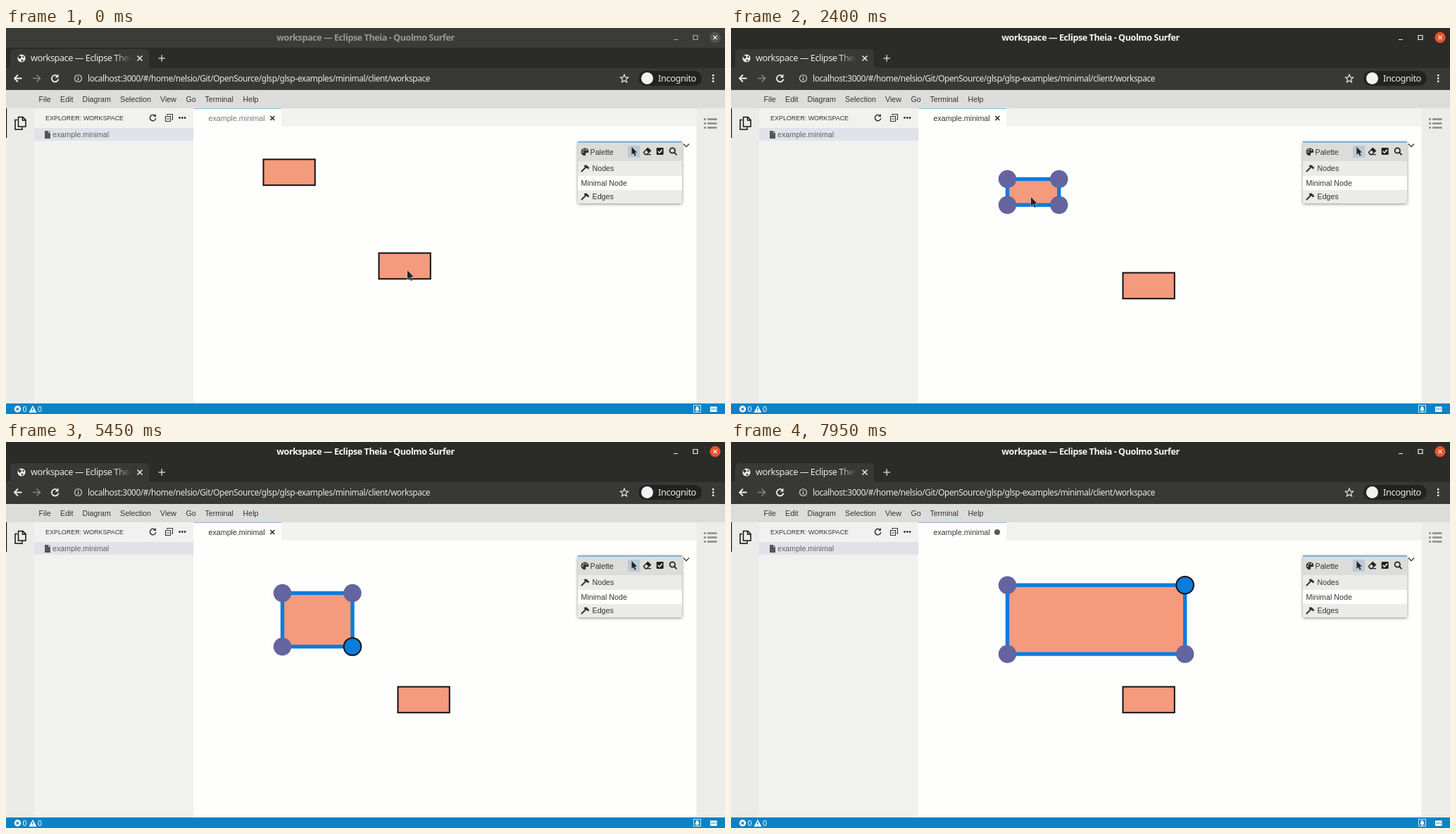
An HTML page for the animation above (8000 ms loop, 1021 px wide and 548 px high).

```html
<!DOCTYPE html>
<html lang="en">
<head>
<meta charset="utf-8">
<title>workspace</title>
<style>
  html, body { margin: 0; width: 100%; height: 100%; overflow: hidden; background: #fefefd; }
  svg { display: block; width: 100%; height: 100%; }
  text { font: 10.7px "Liberation Sans", Arial, sans-serif; fill: #333; white-space: pre; }
  .chrome text { font-family: "Noto Sans", sans-serif; letter-spacing: -.035em; fill: #e8e8e6; }
  .line { fill: none; stroke-width: 1.5; }
  .node { fill: #f49a7d; stroke: #111; stroke-width: 2; }
  .node.selected { stroke: #0b7cdb; stroke-width: 5.4; }
  .handle { fill: #6364a0; }
  .handle.hover { stroke: #10131c; stroke-width: 2; }
  .handle.active { fill: #0b7cdb; }
</style>
</head>
<body>
<svg viewBox="0 0 1021 548">
  <defs>
    <filter id="shadow" x="-10%" y="-10%" width="120%" height="125%">
      <feDropShadow dx="0" dy="1" stdDeviation="2" flood-opacity=".45"/>
    </filter>
    <linearGradient id="fade">
      <stop offset="0" stop-color="#383836" stop-opacity="0"/>
      <stop offset="1" stop-color="#383836"/>
    </linearGradient>
    <clipPath id="tabClip"><rect x="30" y="30" width="147" height="26"/></clipPath>
    <g id="hammer">
      <path d="M0 9L6 3" stroke="#333" stroke-width="2" stroke-linecap="round"/>
      <path d="M3 1Q6-1 8 1L11 4L9 6L7 4L5 4Z" fill="#333"/>
    </g>
  </defs>

  <!-- Browser window -->
  <g class="chrome">
    <rect id="titleBar" width="1021" height="28"/>
    <rect y="28" width="1021" height="29" fill="#2b2b28"/>
    <text id="title" x="510.5" y="18" text-anchor="middle" style="font-size:12.6px;font-weight:700">workspace — Eclipse Theia - Quolmo Surfer</text>
    <g id="buttons" class="line" style="stroke-width:1.2">
      <path d="M948 16.5H954M976 10.5H982V16.5H976Z"/>
      <circle id="close" cx="1007" cy="13.5" r="7.7" stroke="none"/>
      <path d="M1004.3 10.8L1009.7 16.2M1009.7 10.8L1004.3 16.2" stroke="#fff"/>
    </g>

    <path d="M0 57Q6 57 6 51V36Q6 30 12 30H197Q203 30 203 36V51Q203 57 209 57H1021V88H0Z" fill="#383836"/>
    <circle cx="22" cy="43" r="5.6" fill="#eee"/>
    <path d="M18 39Q22 39 22 42L19 44L17 41M23 39L26 41L24 43M21 45L25 45L23 48Z" fill="#383836"/>
    <text x="35" y="47" clip-path="url(#tabClip)" style="font-size:12.7px">workspace — Eclipse Theia</text>
    <rect x="154" y="33" width="24" height="20" fill="url(#fade)"/>
    <g class="line" stroke="#eee">
      <path d="M186.5 39.5L193.5 46.5M193.5 39.5L186.5 46.5"/>
      <path d="M216.500 43H226M221.250 38.250V47.750" stroke="#ccc"/>
      <path d="M22.500 71.500H12.500M17 66.500L12 71.500L17 76.500" stroke-width="1.8"/>
      <path d="M38 71.500H48M43.500 66.500L48.500 71.500L43.500 76.500" stroke="#858582"/>
      <path d="M73.400 68.500A4.800 4.800 0 1 0 74.500 72.500" stroke-width="1.8"/>
      <circle cx="102.500" cy="71.500" r="5" stroke="#ccc" stroke-width="1.200"/>
      <path d="M102.500 70.800V74.500M102.500 68.300V69.700" stroke="#ccc"/>
      <path d="M878 66L879.600 69.900L883.600 70.200L880.500 72.900L881.500 77L878 74.700L874.500 77L875.500 72.900L872.400 70.200L876.400 69.900Z" stroke-width="1.100"/>
    </g>
    <path d="M74.500 65.500V70.500H69.500Z" fill="#eee"/>
    <text x="116" y="75.700" style="font-size:11.900px">localhost:3000/#/home/nelsio/Git/OpenSource/glsp/glsp-examples/minimal/client/workspace</text>
    <rect x="898" y="61" width="90" height="21" rx="10.500" fill="#222320"/>
    <circle cx="910.500" cy="71.500" r="8.500" fill="#f2f2f2"/>
    <text x="926" y="76" style="font-size:12.900px">Incognito</text>
    <path d="M1003 66h2.400v2.400h-2.400zM1003 70.300h2.400v2.400h-2.400zM1003 74.600h2.400v2.400h-2.400z" fill="#eee"/>
  </g>

  <!-- Workbench -->
  <rect y="88" width="1021" height="26" fill="#dcdcda"/>
  <g id="menu"></g>
  <rect y="114" width="40" height="419" fill="#ebebe9"/>
  <rect y="114" width="1.200" height="42" fill="#111"/>
  <g class="line" stroke="#111" stroke-width="1.700">
    <path d="M17.500 126.500H24L28 130.500V140H17.500ZM23.500 126.500V131H28M16 130.500H13V144H23V141"/>
  </g>
  <rect x="40" y="114" width="226.500" height="419" fill="#f1f1f0"/>
  <text x="56" y="131" style="font-size:8.950px">EXPLORER: WORKSPACE</text>
  <g class="line" stroke="#333">
    <path d="M211.800 124.800A4.200 4.200 0 1 0 212.800 128"/>
    <path d="M226.500 125.500H233.500V132.500H226.500ZM229 124V122.500H236.500V130H235M228.300 129H231.700" stroke-width="1.100"/>
  </g>
  <path d="M213 122V126H209Z" fill="#333"/>
  <g fill="#333"><circle cx="246.500" cy="127.500" r="1.400"/><circle cx="250.300" cy="127.500" r="1.400"/><circle cx="254.100" cy="127.500" r="1.400"/></g>
  <rect x="40" y="142" width="226.500" height="18" fill="#e1e2e9"/>
  <path d="M55 146H60V149H63V157H55ZM60.700 146L63 148.300H60.700Z" fill="#555"/>
  <text x="66" y="154.500" style="fill:#616161">example.minimal</text>

  <rect x="266.500" y="114" width="714" height="419" fill="#fefefd"/>
  <rect x="391" y="114" width="589.500" height="26" fill="#f2f2f1"/>
  <rect x="266.500" y="114" width="124.500" height="1" fill="#8dbbe0"/>
  <text id="tabName" x="287.500" y="131.500">example.minimal</text>
  <path id="tabClose" class="line" d="M375.300 125L381.300 131M381.300 125L375.300 131" stroke="#222"/>
  <circle id="dirty" cx="378" cy="128" r="4" fill="#585858"/>

  <rect x="980.500" y="114" width="41" height="419" fill="#ececeb"/>
  <path class="line" d="M991 129.500H994M996 129.500H1009.500M991 135.500H994M996 135.500H1009.500M991 141.500H994M996 141.500H1009.500" stroke="#898989" style="stroke-width:2.600"/>

  <!-- Diagram -->
  <rect id="first" class="node"/>
  <rect id="second" class="node" width="73.300" height="36.700"/>
  <g id="handles"></g>

  <!-- Palette -->
  <path class="line" d="M962 164.500L966 168.700L970 164.500" stroke="#444"/>
  <rect x="812" y="161" width="148" height="88" rx="2" fill="#ebebea" filter="url(#shadow)"/>
  <rect x="812" y="161" width="148" height="28" fill="#dcdcda"/>
  <rect x="812" y="161" width="148" height="1.800" fill="#72aedb"/>
  <rect x="812" y="210" width="148" height="20" fill="#fefefd"/>
  <path d="M822 170.500A5.400 5.400 0 1 0 822 181.300Q824 180.500 823 178.500Q823 177 825 177H827.400Q828 170.500 822 170.500Z" fill="#333"/>
  <g fill="#dcdcda"><circle cx="819" cy="176" r="1"/><circle cx="820.500" cy="173" r="1"/><circle cx="824" cy="173" r="1"/></g>
  <text x="829.500" y="180">Palette</text>
  <rect x="883" y="167" width="17" height="17" fill="#b9cad6"/>
  <path d="M888.500 169V179.700L891 177.500L892.800 181.500L894.600 180.700L892.800 176.800H896Z" fill="#222"/>
  <path d="M905.500 176.500L911.300 170.500L915.500 174.300L910 179.500H907.500Z" fill="none" stroke="#222" stroke-width="1.400"/>
  <path d="M908.700 173.300L911.300 170.500L915.500 174.300L912.700 177ZM907 179H916V180.300H907Z" fill="#222"/>
  <rect x="923.700" y="170" width="10" height="10" rx="1.200" fill="#222"/>
  <path class="line" d="M925.800 175L928 177.200L931.800 172.800" stroke="#fff"/>
  <g class="line" stroke="#222" style="stroke-width:1.800"><circle cx="946.300" cy="174" r="3.700"/><path d="M949 176.700L952.500 180.300"/></g>
  <use href="#hammer" x="817.500" y="194.500"/><text x="832.500" y="203">Nodes</text>
  <text x="816.500" y="223.500">Minimal Node</text>
  <use href="#hammer" x="817.500" y="234.500"/><text x="832.500" y="243">Edges</text>

  <!-- Status bar -->
  <rect y="533" width="1021" height="15" fill="#0a83c4"/>
  <circle cx="16.500" cy="541" r="4.700" fill="#fff"/>
  <path class="line" d="M14.700 539.200L18.300 542.800M18.300 539.200L14.700 542.800" stroke="#0a83c4"/>
  <path d="M38 536L43.500 546H32.500Z" fill="#fff"/>
  <path d="M38 539V543M38 544V545" stroke="#0a83c4" stroke-width="1.300"/>
  <text x="23.500" y="545" style="fill:#fff">0</text><text x="45" y="545" style="fill:#fff">0</text>
  <rect x="976.500" y="535.500" width="10" height="10" fill="none" stroke="#fff" stroke-width=".8"/>
  <path d="M978 543Q979.500 541.500 979.500 539.500Q979.500 537 981.500 537T983.500 539.500Q983.500 541.500 985 543ZM980.300 543.500H982.700V544.700H980.300Z" fill="#fff"/>
  <path d="M1000 537.500H1009.500V545H1000Z" fill="#fff"/>
  <path d="M1001 541H1008.500" stroke="#0a83c4"/>

  <path id="cursor" d="M0 0V12.700L2.900 10L5 14.800L7.100 13.900L5 9.200H9Z" fill="#252525" stroke="#fff" stroke-width=".9" paint-order="stroke" style="filter:drop-shadow(0 .5px .7px #0006)"/>
</svg>
<script>
const $ = id => document.getElementById(id);
const SVG = 'http://www.w3.org/2000/svg';
const LOOP = 8000, STEP = 50;

function add(parent, tag, attrs, text = '') {
  const el = parent.appendChild(document.createElementNS(SVG, tag));
  set(el, attrs);
  el.textContent = text;
  return el;
}
function set(el, attrs) {
  for (const name in attrs) el.setAttribute(name, attrs[name]);
}
function show(el, visible) {
  el.style.display = visible ? '' : 'none';
}

const menu = { File: 46.5, Edit: 77, Diagram: 108.5, Selection: 162, View: 219, Go: 255.5, Terminal: 282.5, Help: 336.5 };
for (const name in menu) add($('menu'), 'text', { x: menu[name], y: 104.5 }, name);
const handles = [0, 1, 2, 3].map(() => add($('handles'), 'circle', {}));

// Keys are [time, x, y]; positions between them are linear.
const cursorPath = [
  [50, 570, 344], [100, 571, 334], [200, 572, 307], [350, 572, 307], [450, 552, 262], [500, 552, 262],
  [550, 556, 268], [1100, 579, 290], [1350, 579, 290], [1400, 449, 257], [1600, 453, 254], [1700, 453, 254],
  [1800, 451, 240], [1950, 451, 240], [2000, 426, 240], [3150, 426, 240], [3400, 442, 233],
  [3650, 442, 233], [3850, 466, 250], [5900, 500, 300], [6000, 500, 300], [6200, 505, 238],
  [6300, 501, 268], [6450, 501, 268], [6600, 500, 216]
];
const panPath = [[500, 0, 0], [550, 4, 6], [1100, 27, 28]];
const lowerRightPath = [[4050, 465.8, 251.2], [4850, 481, 285], [5300, 492, 290.5], [5450, 492, 290.5], [5750, 498, 301]];
const upperRightPath = [[7050, 498, 214.5], [7250, 591.5, 208], [7450, 619, 204.5], [7550, 619, 204.5], [7950, 644.7, 203.2]];

function along(path, t) {
  const next = path.findIndex(key => key[0] > t);
  if (next === 0) return path[0].slice(1);
  if (next < 0) return path[path.length - 1].slice(1);
  const [t0, x0, y0] = path[next - 1], [t1, x1, y1] = path[next];
  const p = (t - t0) / (t1 - t0);
  return [x0 + (x1 - x0) * p, y0 + (y1 - y0) * p];
}

function drawWindow(t) {
  const focused = t >= 450, dirty = t >= 5900;
  set($('titleBar'), { fill: focused ? '#2b2b28' : '#3b3b38' });
  $('title').style.fill = focused ? '#f5f5f3' : '#989894';
  set($('buttons'), { stroke: focused ? '#eee' : '#aaa' });
  set($('close'), { fill: focused ? '#e4552d' : '#555550' });
  $('tabName').style.fill = focused ? '#333' : '#777';
  show($('dirty'), dirty);
  show($('tabClose'), !dirty);
}

function drawDiagram(t) {
  const [panX, panY] = along(panPath, t);
  const left = 365.5 + panX;
  let top = 186.5 + panY, right = left + 73.3, bottom = top + 36.7;
  set($('second'), { x: left + 164, y: top + 133 });

  if (t >= 4050) [right, bottom] = along(lowerRightPath, t);
  if (t >= 7050) [right, top] = along(upperRightPath, t);
  const selected = t >= 2400;
  set($('first'), {
    x: left, y: top, width: right - left, height: bottom - top,
    class: selected ? 'node selected' : 'node'
  });

  show($('handles'), selected);
  const corners = [[left, top], [right, top], [right, bottom], [left, bottom]];
  const hovered = t >= 6600 ? 1 : t >= 3850 && t < 6050 ? 2 : -1;
  const active = t >= 7050 || t > 4050 && t < 5900;
  handles.forEach((handle, i) => set(handle, {
    cx: corners[i][0], cy: corners[i][1], r: i === hovered ? 12.3 : 12.7,
    class: 'handle' + (i === hovered ? ' hover' + (active ? ' active' : '') : '')
  }));
}

function draw(now) {
  const t = Math.floor(now % LOOP / STEP) * STEP;
  drawWindow(t);
  drawDiagram(t);
  show($('cursor'), t < 4050 || t >= 5900 && t < 6800);
  set($('cursor'), { transform: `translate(${along(cursorPath, t)})` });
  requestAnimationFrame(draw);
}
requestAnimationFrame(draw);
</script>
</body>
</html>
```
